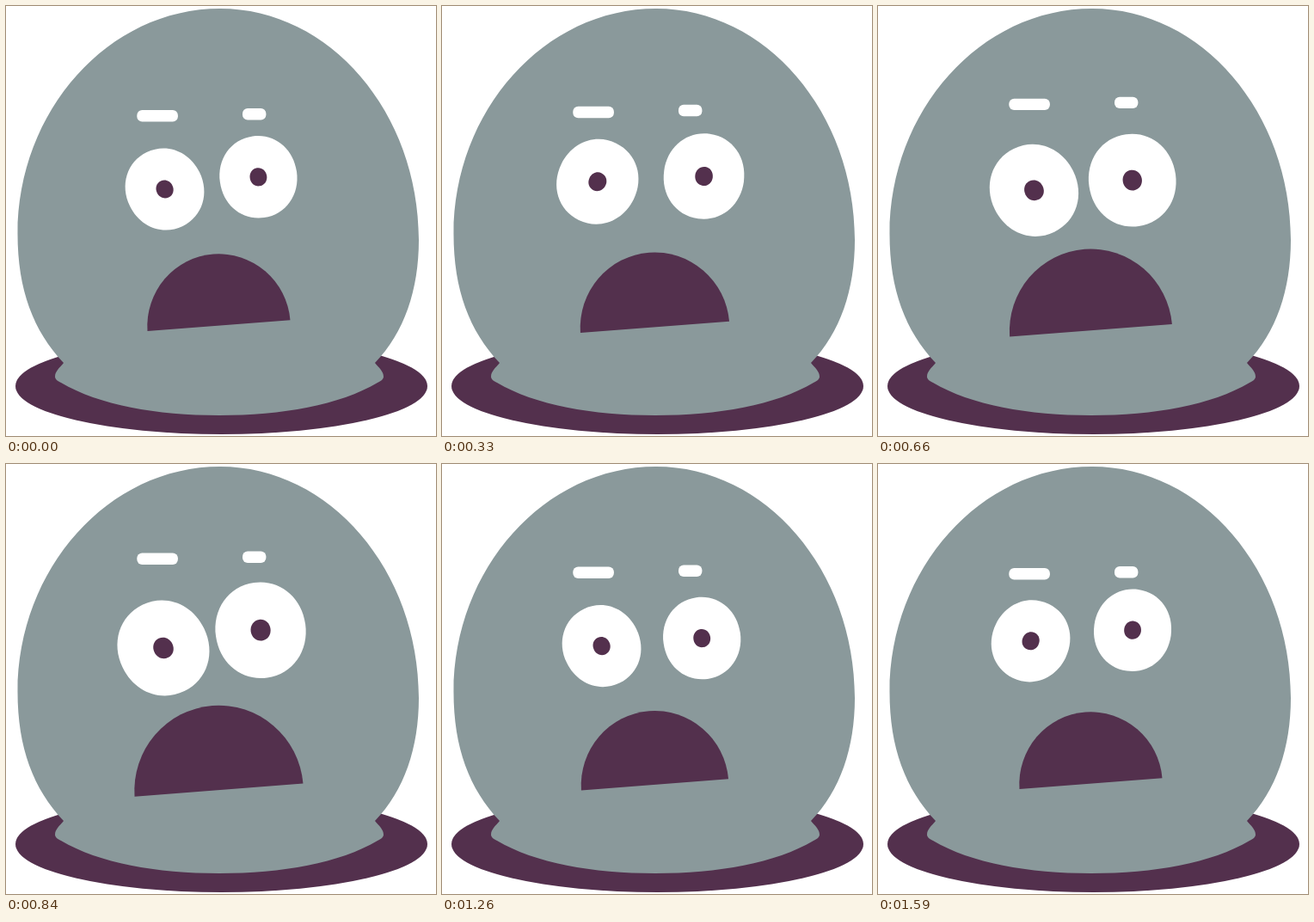
An HTML page that plays this animation: 500 by 500 pixels, repeating every 1.62 s.

```html
<!DOCTYPE html>
<html lang="en">
<head>
<meta charset="utf-8">
<title>Startled blob</title>
<style>
  html, body { margin: 0; width: 100%; height: 100%; overflow: hidden; background: #fff; }
  svg { display: block; width: 100vw; height: 100vh; }
  .skin { fill: #8a999b; }
  .dark { fill: #53304d; }
  .light { fill: #fff; }
</style>
</head>
<body>
<svg viewBox="0 0 500 500">
  <defs>
    <path id="blob" d="M0-1C.57-1 1-.57 1 0S.57 1 0 1-1 .57-1 0-.57-1 0-1Z"/>
    <g id="eye">
      <use href="#blob" class="light" transform="scale(45 47.8)"/>
      <use href="#blob" class="dark" transform="scale(9.9 10.6)"/>
    </g>
  </defs>
  <ellipse class="dark" cx="250.5" cy="442" rx="239.5" ry="56"/>
  <path class="skin" d="M249 3C376.5 3 480 124 480 272C480 330 463 380 429 415
    C434 421 439 425 439 431C439 434 436 436 432 438C388 464 321 476 248 476
    C175 476 108 464 64 438C60 436 57 434 57 431C57 425 62 421 67 415
    C32 378 13.5 330 13.5 265C13.5 122 119 3 249 3Z"/>
  <g id="brows" class="light">
    <rect x="152.3" y="121" width="47.6" height="13.4" rx="6"/>
    <rect x="275" y="119" width="27.4" height="13.4" rx="6"/>
  </g>
  <use id="left" href="#eye"/>
  <use id="right" href="#eye"/>
  <path id="mouth" class="dark" d="M164.5 378A83.25 84.1 -4.4 0 1 330.5 365.2Z"/>
</svg>
<script>
const LOOP = 1620, STEP = 30;
const $ = id => document.getElementById(id);
const brows = $('brows'), mouth = $('mouth');

// Each eye jumps round a small circle; angles in degrees, spin per step
const eyes = [
  { el: $('left'), x: 181.2, y: 209.3, r: 5, start: 60, spin: 180, sway: 33, lag: 22, lean: 26 },
  { el: $('right'), x: 299, y: 198, r: 5.6, start: 172, spin: 144, sway: 46, lag: 0, lean: 8 }
];

const rad = deg => deg * Math.PI / 180;

const smooth = (a, b, t) => {
  const x = Math.min(1, Math.max(0, (t - a) / (b - a)));
  return x * x * (3 - 2 * x);
};
// Slow swell, then a quick release between the given times
const swell = (t, from, to) => smooth(30, 1035, t) * (1 - smooth(from, to, t));

function shake(eye, n, grow) {
  const drift = eye.sway * Math.sin(rad(360 * n * STEP / LOOP - eye.lag));
  const a = rad(eye.start + eye.spin * n + drift);
  const x = eye.x + eye.r * Math.cos(a), y = eye.y + eye.r * Math.sin(a);
  const tilt = n % 2 ? eye.lean : -eye.lean;
  eye.el.setAttribute('transform', `translate(${x} ${y}) rotate(${tilt}) scale(${grow})`);
}

function draw(now) {
  const n = Math.floor((now + 0.5) % LOOP / STEP), t = n * STEP;
  const grow = 1 + 0.185 * swell(t, 1075, 1255);
  eyes.forEach(eye => shake(eye, n, grow));
  brows.setAttribute('transform', `translate(0 ${-19.4 * swell(t, 1115, 1290)})`);
  const open = 1 + 0.2 * swell(t, 1115, 1308);
  mouth.setAttribute('transform', `translate(247.5 330) scale(${open}) translate(-247.5 -330)`);
}

function tick(now) {
  draw(now);
  requestAnimationFrame(tick);
}
draw(0);
requestAnimationFrame(tick);
</script>
</body>
</html>
```
